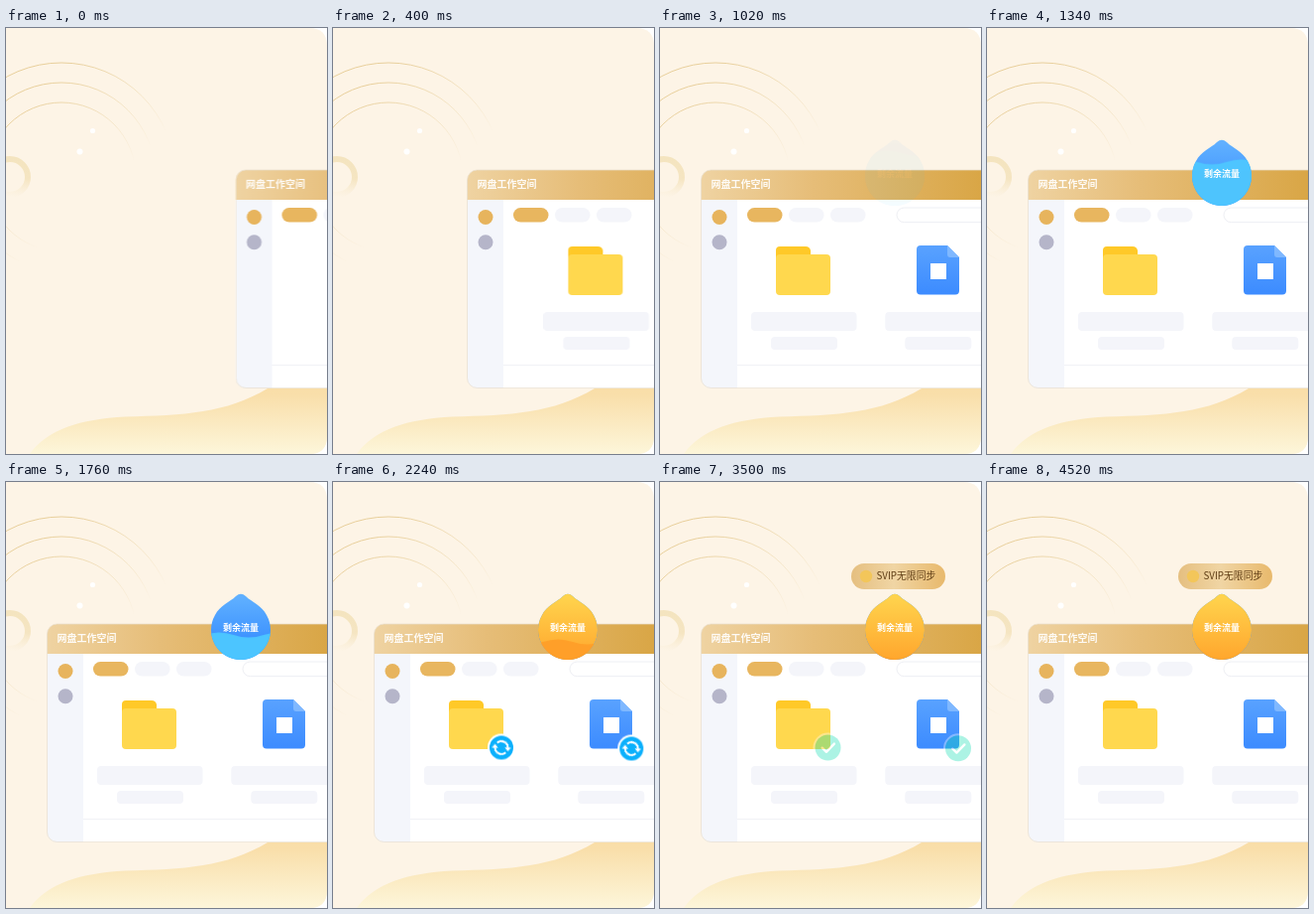
Recreate the animation shown at these times as an HTML page. Size 324 px wide and 429 px high, loop 4.8 s.

```html
<!DOCTYPE html>
<html lang="zh-CN">
<head>
<meta charset="utf-8">
<title>网盘工作空间</title>
<style>
  html, body { margin: 0; width: 100%; height: 100%; overflow: hidden; background: #fff; }
  svg { display: block; width: 100%; height: 100%; }
  text { font-family: "Noto Sans CJK SC", "Noto Sans CJK", "Noto Sans", sans-serif; }
  .title, .left { font-weight: 700; fill: #fff; }
  .title { font-size: 10px; fill-opacity: .92; }
  .left { font-size: 9px; text-anchor: middle; }
  .label { font-size: 9.8px; font-weight: 500; fill: #5f3d14; }
  .soft { fill: #f4f5fa; }

  .window, .files, .drop, .gold, .level, .water, .badge, .sync, .check {
    animation: 4.8s linear infinite both;
  }
  .window { animation-name: slide; --from: 190.5px; }
  .files { animation-name: slide; --from: 53.5px; }
  .drop { animation-name: drop; }
  .gold { animation-name: gold; }
  .level { animation-name: level; }
  .water { animation-name: tint; }
  .drift { animation: drift .6s linear infinite; }
  .badge { animation-name: badge; }
  .sync { animation-name: sync; }
  .check { animation-name: check; }
  .spin { animation: spin .6s linear infinite; }

  @keyframes slide {
    0%, 2.08% { transform: translateX(var(--from)); animation-timing-function: cubic-bezier(.5, 0, .306, 1); }
    16.67%, 100% { transform: none; }
  }
  @keyframes drop {
    0%, 20.83% { opacity: 0; }
    28%, 100% { opacity: 1; }
  }
  @keyframes gold {
    0%, 39% { opacity: 0; }
    44.5%, 100% { opacity: 1; }
  }
  @keyframes level {
    0%, 24% { transform: translateY(126px); }
    36.67% { transform: translateY(154px); }
    46.67%, 65% { transform: translateY(161px); }
    75.4%, 100% { transform: translateY(184px); }
  }
  @keyframes tint {
    0%, 39% { fill: #4cc5ff; }
    44.5%, 100% { fill: #ff9f29; }
  }
  @keyframes drift { to { transform: translateX(-60px); } }
  @keyframes badge {
    0%, 52.5% { opacity: 0; }
    62.5%, 100% { opacity: 1; }
  }
  @keyframes sync {
    0%, 43.4% { opacity: 0; }
    46%, 55% { opacity: 1; }
    57.5%, 100% { opacity: 0; }
  }
  @keyframes check {
    0%, 54.5% { opacity: 0; }
    57.5%, 68% { opacity: 1; }
    75.6%, 100% { opacity: 0; }
  }
  @keyframes spin { to { transform: rotate(360deg); } }
</style>
</head>
<body>
<svg viewBox="0 0 324 429" preserveAspectRatio="none">
  <defs>
    <clipPath id="stage"><path d="M0 0H306Q324 0 324 18V411Q324 429 306 429H0Z"/></clipPath>
    <clipPath id="frame"><rect x="41.5" y="143" width="420" height="220" rx="10"/></clipPath>
    <path id="tear" d="M232 115Q237 110.5 242 115C248 121 258 124 263 134A30 30 0 1 1 211 134C216 124 226 121 232 115Z"/>
    <clipPath id="inside"><use href="#tear"/></clipPath>
    <linearGradient id="arc" gradientUnits="userSpaceOnUse" x1="60" y1="35" x2="140" y2="125">
      <stop stop-color="#e8cf9b"/><stop offset="1" stop-color="#e8cf9b" stop-opacity="0"/>
    </linearGradient>
    <linearGradient id="ring" gradientUnits="userSpaceOnUse" x1="10" y1="130" x2="4" y2="170">
      <stop stop-color="#f4e4bf"/><stop offset=".5" stop-color="#f5e5c2"/>
      <stop offset="1" stop-color="#f9ecd2" stop-opacity="0"/>
    </linearGradient>
    <linearGradient id="hill" x2="0" y2="1">
      <stop stop-color="#f9dba0"/><stop offset=".3" stop-color="#f9dfab"/><stop offset="1" stop-color="#fdf6da"/>
    </linearGradient>
    <linearGradient id="bar" gradientUnits="userSpaceOnUse" x1="41" y1="0" x2="324" y2="0">
      <stop stop-color="#efd3a2"/><stop offset=".4" stop-color="#e6bd78"/><stop offset="1" stop-color="#d9a646"/>
    </linearGradient>
    <linearGradient id="doc" x2="0" y2="1">
      <stop stop-color="#59a2ff"/><stop offset="1" stop-color="#3c8bff"/>
    </linearGradient>
    <linearGradient id="blue" x2="0" y2="1">
      <stop stop-color="#62b2ff"/><stop offset=".65" stop-color="#3f94ff"/><stop offset="1" stop-color="#3f94ff"/>
    </linearGradient>
    <linearGradient id="amber" x2="0" y2="1">
      <stop stop-color="#ffd54e"/><stop offset="1" stop-color="#ffa62d"/>
    </linearGradient>
    <linearGradient id="pill">
      <stop stop-color="#e5bf80"/><stop offset=".45" stop-color="#f0d5a4"/><stop offset="1" stop-color="#e8b96c"/>
    </linearGradient>

    <g id="lines">
      <rect class="soft" x="92" y="286" width="106.5" height="19" rx="4"/>
      <rect class="soft" x="112" y="311" width="67" height="13" rx="4"/>
    </g>
    <g id="turning">
      <circle r="14" fill="#fff"/>
      <circle r="12" fill="#0bb0fc"/>
      <g class="spin">
        <path d="M-6.4 -1A6.5 6.5 0 0 1 5.2 -3.9M6.4 1A6.5 6.5 0 0 1 -5.2 3.9" fill="none" stroke="#fff" stroke-width="2"/>
        <path d="M7.4 -6.2V-1.2L2.4 -2.2ZM-7.4 6.2V1.2L-2.4 2.2Z" fill="#fff"/>
      </g>
    </g>
    <g id="done">
      <circle r="15" fill="#fff"/>
      <circle r="13" fill="#14deb3"/>
      <path d="M-5.8 .2L-1.6 4.3L6.4 -3.9" fill="none" stroke="#fff" stroke-width="2.4" stroke-linecap="round" stroke-linejoin="round"/>
    </g>
  </defs>

  <g clip-path="url(#stage)">
    <rect width="324" height="429" fill="#fdf4e6"/>
    <g fill="none" stroke="url(#arc)" stroke-width="1">
      <circle cx="56" cy="150" r="115"/>
      <circle cx="56" cy="150" r="95"/>
      <circle cx="56" cy="150" r="75"/>
    </g>
    <circle cx="4" cy="150" r="18" fill="none" stroke="url(#ring)" stroke-width="6"/>
    <circle cx="87.5" cy="103.5" r="2.6" fill="#fff"/>
    <circle cx="74.5" cy="124.5" r="3" fill="#fff"/>
    <path d="M24 429C42 404 75 394 120 391.5C180 390 222 388 264 363L290 346H324V429Z" fill="url(#hill)"/>

    <g class="window">
      <g clip-path="url(#frame)">
        <rect x="41" y="143" width="421" height="220" fill="#fff"/>
        <rect x="41" y="173" width="37" height="190" fill="#f4f6fb"/>
        <rect x="41" y="143" width="421" height="30" fill="url(#bar)"/>
        <text class="title" x="51.5" y="160.7">网盘工作空间</text>
        <circle cx="60" cy="190.5" r="7.5" fill="#e7b45d"/>
        <circle cx="60" cy="215.7" r="7.5" fill="#b5b5c9"/>
        <rect x="88" y="181" width="35.5" height="14.6" rx="7.3" fill="#e8b65f"/>
        <rect class="soft" x="130" y="181" width="35.5" height="14.6" rx="7.3"/>
        <rect class="soft" x="172" y="181" width="35.5" height="14.6" rx="7.3"/>
        <rect x="239" y="181" width="120" height="14.6" rx="7.3" fill="#fff" stroke="#eeeff4"/>
        <path d="M78 339.5H462" stroke="#f1f2f6"/>
        <g class="files">
          <path d="M117 262V224Q117 220 121 220H147Q151 220 152 224V232H130Z" fill="#ffc928"/>
          <rect x="117" y="228" width="55" height="41" rx="4" fill="#ffd84e"/>
          <path d="M263 219H290L302 231V264.5Q302 268.5 298 268.5H263Q259 268.5 259 264.5V223Q259 219 263 219Z" fill="url(#doc)"/>
          <path d="M290 219L302 231H293Q290 231 290 228Z" fill="#7fb8ff"/>
          <rect x="273" y="237" width="16" height="16" fill="#fff"/>
          <use href="#lines"/>
          <use href="#lines" x="135.3"/>
        </g>
      </g>
      <rect x="41.5" y="143" width="420" height="219.5" rx="10" fill="none" stroke="#e9dfcd" stroke-width=".7"/>
    </g>

    <g class="drop">
      <use href="#tear" fill="url(#blue)"/>
      <use class="gold" href="#tear" fill="url(#amber)"/>
      <g clip-path="url(#inside)">
        <g class="level">
          <g class="drift">
            <path class="water" d="M196 0q15 -5 30 0t30 0t30 0t30 0t30 0V70H196Z"/>
          </g>
        </g>
      </g>
      <text class="left" x="237" y="150.4">剩余流量</text>
    </g>

    <g class="sync">
      <use href="#turning" x="170" y="267.5"/>
      <use href="#turning" x="301.3" y="268.5"/>
    </g>
    <g class="check">
      <use href="#done" x="169.5" y="267.5"/>
      <use href="#done" x="301" y="268.3"/>
    </g>

    <g class="badge">
      <rect x="193" y="82" width="95" height="26" rx="13" fill="url(#pill)"/>
      <circle cx="208" cy="95" r="6.2" fill="#f3c65a"/>
      <text class="label" x="218.5" y="98.3">SVIP无限同步</text>
    </g>
  </g>
</svg>
</body>
</html>
```
